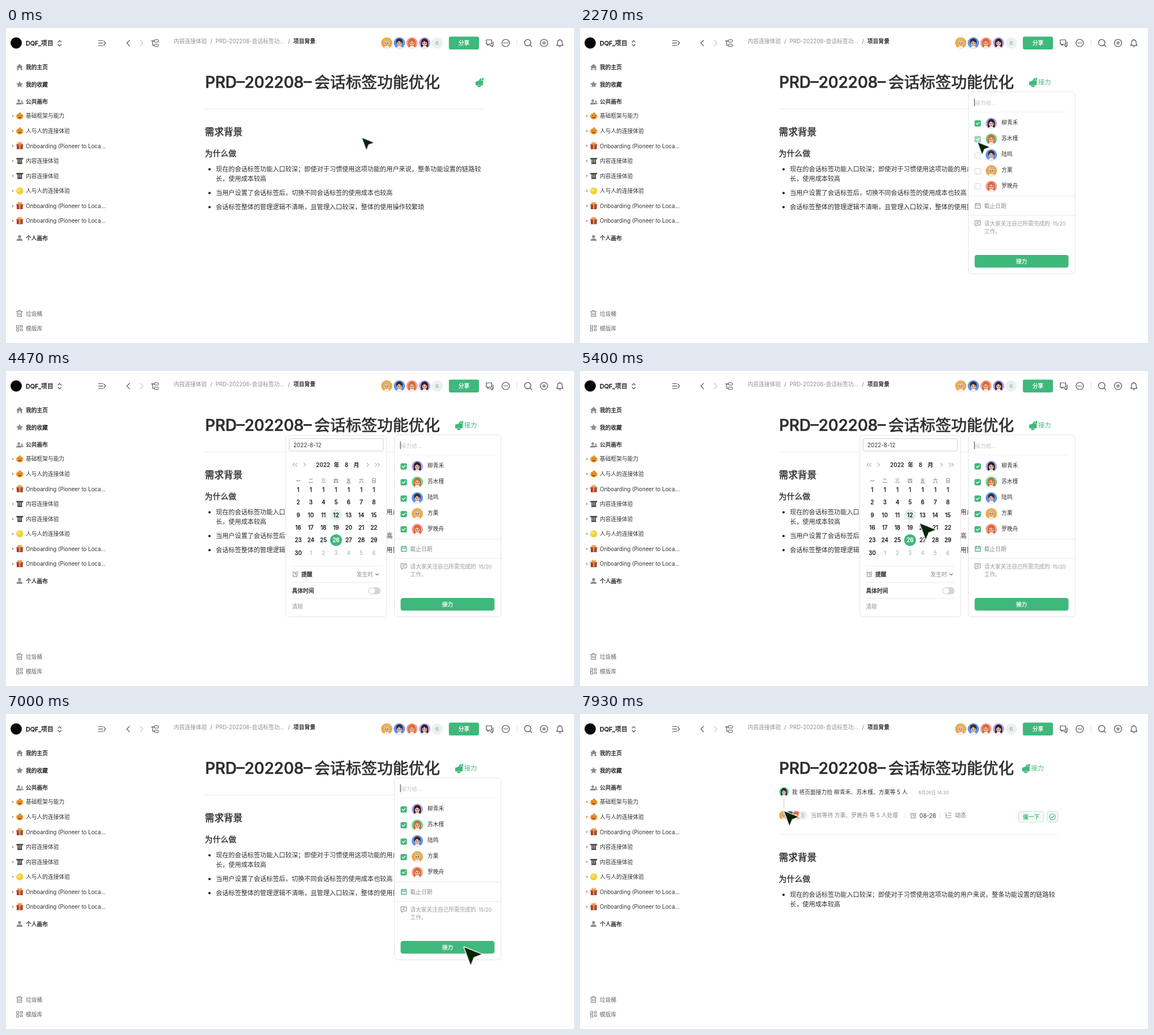
Write an HTML page that moves like this. It is 1004 by 558 pixels and loops after 8000 ms.

```html
<!DOCTYPE html>
<html lang="zh-CN">
<head>
<meta charset="utf-8">
<title>页面接力</title>
<style>
html, body { margin: 0; width: 100%; height: 100%; overflow: hidden; background: #fff; }
svg { display: block; width: 1004px; height: 558px; font-family: Inter, "Noto Sans CJK SC", "Noto Sans CJK", sans-serif; }
.anim { animation: 8s linear infinite both; }

#cursor { animation-name: move; }
@keyframes move {
  0%, .9% { transform: translate(629.5px, 194.8px); opacity: 1; animation-timing-function: ease-in-out; }
  8.7%, 15% { transform: translate(833.7px, 97.5px); animation-timing-function: ease-in-out; }
  23.5%, 25.5% { transform: translate(700px, 174px); animation-timing-function: ease-in-out; }
  27.9%, 29.5% { transform: translate(703.3px, 202.8px); animation-timing-function: ease-in-out; }
  32%, 33.5% { transform: translate(703px, 231px); animation-timing-function: ease-in-out; }
  35.8%, 37% { transform: translate(703px, 262px); animation-timing-function: ease-in-out; }
  39.5%, 41% { transform: translate(703px, 286px); animation-timing-function: ease-in-out; }
  44%, 47.5% { transform: translate(701px, 311px); opacity: 1; }
  51% { transform: translate(701px, 311px); opacity: 0; animation-timing-function: step-end; }
  58% { transform: translate(574px, 246px) scale(1.2); opacity: 0; }
  60%, 64% { transform: translate(574px, 246px) scale(1.2); opacity: 1; animation-timing-function: ease-in; }
  68.4% { transform: translate(613px, 281px) scale(1.42); }
  77.5% { transform: translate(714.8px, 375.3px) scale(1.44); }
  79.1% { transform: translate(738px, 385px) scale(1.47); animation-timing-function: ease-out; }
  84.5% { transform: translate(810px, 413.3px) scale(1.5); opacity: 1; }
  92.49% { transform: translate(810px, 413.3px) scale(1.5); opacity: 1; animation-timing-function: step-end; }
  92.5% { transform: translate(361px, 172.3px) scale(1.22); opacity: 0; animation-timing-function: step-end; }
  94.1%, 100% { transform: translate(361px, 172.3px) scale(1.22); opacity: 1; }
}
#relay { animation-name: slide; }
@keyframes slide {
  0%, 8.8% { transform: none; animation-timing-function: ease-out; }
  12.4%, 95.8% { transform: translateX(-36px); animation-timing-function: ease-in-out; }
  99.1%, 100% { transform: translateX(-48.5px); }
}
#relayText { animation-name: label; }
@keyframes label { 0%, 8.8% { opacity: 0; } 12.4%, 100% { opacity: 1; } }
#panel { animation-name: panel; }
@keyframes panel {
  0%, 15% { opacity: 0; transform: translateY(-42px); animation-timing-function: ease-out; }
  19.5%, 92.49% { opacity: 1; transform: none; }
  92.5%, 100% { opacity: 0; transform: none; }
}
#calendar { animation-name: calendar; }
@keyframes calendar { 0%, 49% { opacity: 0; } 54%, 69.2% { opacity: 1; } 73.5%, 100% { opacity: 0; } }
#caret { animation-name: blink; animation-timing-function: step-end; }
@keyframes blink { 0%, 37.5%, 48% { opacity: 1; } 32.5%, 43% { opacity: 0; } }
.check { animation-name: check; }
@keyframes check { 0% { opacity: 0; } 1.75%, 70% { opacity: 1; } 70.1%, 100% { opacity: 0; } }
#send { animation-name: press; transform-box: fill-box; transform-origin: center; }
@keyframes press { 0%, 81.5% { transform: none; } 84.5% { transform: scale(1.07); } 87.4%, 100% { transform: none; } }
#body { animation-name: push; }
@keyframes push { 0%, 95.8% { transform: none; animation-timing-function: ease-in-out; } 99.1%, 100% { transform: translateY(70px); } }
#rest { animation-name: leave; }
@keyframes leave { 0%, 95.8% { opacity: 1; } 98.3%, 100% { opacity: 0; } }
#status { animation-name: enter; }
@keyframes enter { 0%, 95.8% { opacity: 0; } 99.1%, 100% { opacity: 1; } }
</style>
</head>
<body>
<svg id="stage" viewBox="0 0 1004 558"></svg>
<script>
const GREEN = '#3fb87b', INK = '#2f2f2f', GREY = '#909090';
const PEOPLE = ['柳青禾', '苏木槿', '陆鸣', '方栗', '罗晚舟'];

// Text is placed by its vertical centre; a hairline stroke gives the medium weight.
const text = (x, cy, size, str, fill = INK, weight = 400, anchor = 'start') =>
  `<text x="${x}" y="${cy + size * .37}" font-size="${size}" fill="${fill}" font-weight="${weight}" text-anchor="${anchor}"` +
  (weight === 500 ? ` stroke="${fill}" stroke-width="${size * .027}"` : '') + `>${str}</text>`;
const line = (d, color = '#4a4a4a', w = 1.2) =>
  `<path d="${d}" fill="none" stroke="${color}" stroke-width="${w}" stroke-linecap="round" stroke-linejoin="round"/>`;
const shape = (d, fill) => `<path d="${d}" fill="${fill}"/>`;
const dot = (x, y, r, fill) => `<circle cx="${x}" cy="${y}" r="${r}" fill="${fill}"/>`;
const ring = (x, y, r, color = '#4a4a4a', w = 1.2) =>
  `<circle cx="${x}" cy="${y}" r="${r}" fill="none" stroke="${color}" stroke-width="${w}"/>`;
const box = (x, y, w, h, rx, fill, stroke = 'none') =>
  `<rect x="${x}" y="${y}" width="${w}" height="${h}" rx="${rx}" fill="${fill}" stroke="${stroke}"/>`;
const rule = (x1, x2, y, color = '#e9e9e9') => line(`M${x1} ${y}H${x2}`, color, 1);
const at = (x, y, inner, s = 1) => `<g transform="translate(${x} ${y}) scale(${s})">${inner}</g>`;
const layer = (id, inner) => `<g id="${id}" class="anim">${inner}</g>`;
const times = (list, fn) => list.map(fn).join('');

const LOOKS = {
  blond: ['#f0a848', '#d9b878'], dark: ['#5b92f5', '#3a2c2a'], ginger: ['#f59a9c', '#d9672b'],
  long: ['#b5a0ee', '#2b2230'], mint: ['#5fd6a0', '#d9672b'], mintLong: ['#5fd6a0', '#2b2230']
};
function avatar(x, y, r, look) {
  const [bg, hair] = LOOKS[look];
  const sides = /long|mint|ginger/i.test(look) ? `<rect x="-6.4" y="-5" width="12.8" height="13" rx="4" fill="${hair}"/>` : '';
  return at(x, y, dot(0, 0, 10, bg) + sides + dot(0, -2, 5.9, hair) +
    shape('M-4.8 8.6Q-4 5.2 0 5.2T4.8 8.6Q0 11 -4.8 8.6Z', '#f6f1ee') +
    '<ellipse cy=".8" rx="4.3" ry="4.9" fill="#efc3a2"/>' +
    dot(-1.8, .3, .9, '#3a2c2a') + dot(1.8, .3, .9, '#3a2c2a') +
    line('M-1.4 3.4Q0 4.4 1.4 3.4', '#a8503f', .8) +
    shape('M-4.6 -.8Q-4.8 -6 0 -6T4.6 -.8Q1 -2 -.6 -3.8Q-2 -1.8 -4.6 -.8Z', hair), r / 10);
}

const alarm = (x, y) => at(x, y, ring(0, .4, 4, '#777', 1) +
  line('M0 -2V.6H2M-5 -3L-3 -4.8M5 -3L3 -4.8M-3 4L-4 5M3 4L4 5', '#777', 1));
const chevron = (x, y, dir, color = '#666', w = 1) => line(`M${x - 1.5 * dir} ${y - 3}l${3 * dir} 3l${-3 * dir} 3`, color, w);

const EMOJI = {
  pumpkin: '<ellipse cy=".6" rx="6.3" ry="5.5" fill="#f29a2b"/>' + shape('M-1 -4.2Q-1 -6.5 1.6 -6.4L1.4 -4Z', '#5f8a35') +
    shape('M-3.6 0L-2.4 -2L-1.2 0ZM1.2 0L2.4 -2L3.6 0ZM-3.6 2H3.6Q2.2 4.2 0 4.2T-3.6 2Z', '#8a470c'),
  gift: box(-5.4, -1.4, 10.8, 7.2, .8, '#a8402c') + box(-6, -3.4, 12, 3, .6, '#c4503a') +
    box(-1.2, -3.4, 2.4, 9.2, 0, '#d9a441') + line('M0 -3.6Q-4.6 -4 -3 -5.8T0 -3.6Q4.6 -4 3 -5.8T0 -3.6', '#d9a441', 1.4),
  columns: box(-6, -5.2, 12, 2.4, 0, '#3f3a34') + box(-4.2, 3.2, 8.4, 2.2, 0, '#3f3a34') +
    times([-2.9, 0, 2.9], x => box(x - 1.1, -3, 2.2, 6.4, 0, '#5a5348')),
  moon: dot(0, 0, 6.2, '#f6cf2f') + dot(-1.5, -1.5, 3, '#fbe06a')
};

function topBar() {
  return dot(18, 26.5, 10, '#050505') + text(35, 27, 10.8, 'DQF_项目', '#1d1d1d', 500) +
    line('M92 25L94.8 22.2L97.6 25M92 29L94.8 31.8L97.6 29', '#444', 1.1) +
    line('M163.5 22.5H171M163.5 26.7H171M163.5 31H171M173 23.2L175.8 26.7L173 30.2') +
    line('M218.4 21.8L213.6 26.7L218.4 31.6') + line('M237.4 21.8L242.2 26.7L237.4 31.6', '#c4c4c4') +
    box(262.3, 20.8, 7, 4.2, .8, 'none', '#4a4a4a') + box(262.3, 28.6, 7, 4.2, .8, 'none', '#4a4a4a') +
    line('M257 22.9H262M259.3 22.9V30.7H262', '#4a4a4a', 1.1) +
    text(296.5, 23.3, 9.75, '内容连接体验', GREY) + text(361, 23.3, 9.75, '/', '#777') +
    text(370.5, 23.3, 9.75, 'PRD-202208-会话标签功...', GREY) + text(498.5, 23.3, 9.75, '/', '#777') +
    text(508, 23.3, 9.75, '项目背景', '#222', 500) +
    times(['blond', 'dark', 'ginger', 'long'], (k, i) => avatar(673 + i * 22.3, 26.5, 10, k)) +
    dot(762.3, 26.5, 10, '#eeefef') + text(762.3, 26.8, 9.5, '6', '#71b394', 400, 'middle') +
    box(782.8, 15.2, 53.2, 22.8, 3, GREEN) + text(809.5, 26.6, 9.8, '分享', '#fff', 500, 'middle') +
    line('M850.5 21H858.5V28.5H854L851.5 30.8V28.5H849V21ZM861 24.5V31.2H859.6V33.3L857 31.2H855') +
    ring(883.3, 26.5, 6.5) + times([-2.8, 0, 2.8], x => dot(883.3 + x, 26.5, .9, '#4a4a4a')) +
    line('M903.3 20.5V33', '#ddd', 1) + ring(922.2, 26, 5.6) + line('M926.4 30.2L929.2 33') +
    ring(951, 26.5, 6.5) + line('M948 26.5H954M951 23.5V29.5') +
    line('M973.5 30.8Q975 29.3 975 25.5Q975 21.2 979 21.2T983 25.5Q983 29.3 984.5 30.8ZM977.5 33H980.5M979 19.8V21');
}

function sidebar() {
  const heads = [[69.3, '我的主页'], [100, '我的收藏'], [130.7, '公共画布'], [372, '个人画布']];
  const board = 'Onboarding (Pioneer to Loca...';
  const rows = [['pumpkin', '基础框架与能力'], ['pumpkin', '人与人的连接体验'], ['gift', board], ['columns', '内容连接体验'],
    ['columns', '内容连接体验'], ['moon', '人与人的连接体验'], ['gift', board], ['gift', board]];
  const person = dot(0, -2.6, 2.7, '#8d8d8d') + shape('M-5.4 5Q-5.4 .8 0 .8T5.4 5Z', '#8d8d8d');
  return times(heads, ([y, s]) => text(35, y, 9.75, s, '#1c1c1c', 500)) +
    times(rows, ([icon, s], i) => {
      const y = 155.8 + i * 26.55;
      return shape(`M11 ${y - 2.3}L14 ${y}L11 ${y + 2.3}Z`, '#9b9b9b') + at(24.3, y, EMOJI[icon]) +
        text(35, y, 9.75, s, '#333');
    }) +
    shape('M18 69L24 63.4L30 69H28.4V74.8H25.6V71H22.4V74.8H19.6V69Z', '#8d8d8d') +
    shape('M24 93.8L25.8 97.6L30 98.2L27 101.1L27.7 105.3L24 103.3L20.3 105.3L21 101.1L18 98.2L22.2 97.6Z', '#8d8d8d') +
    at(22.5, 131, person, .9) + at(28, 131.5, person, .6) + at(24, 372, person) +
    line('M18.5 502.3H29M20 502.5V511H27.6V502.5M21.6 500.5H26M22.5 505V508.6M25.2 505V508.6', '#777', 1.1) +
    text(35, 506, 9.75, '垃圾桶', '#666') +
    times([[18.7, 527], [25.3, 527], [18.7, 533], [25.3, 533]], ([x, y], i) => box(x, y, 3.8, i % 2 ? 3 : 4, 0, 'none', '#777')) +
    text(35, 532, 9.75, '模版库', '#666');
}

function article() {
  const item = (y, ...rows) => dot(359.8, y + .3, 2.1, '#222') + times(rows, (s, i) => text(371, y + i * 16.8, 11.17, s));
  return text(352, 96, 27.75, 'PRD–202208–<tspan x="545">会话标签功能优化</tspan>', INK, 500) +
    layer('relay', shape('M830 95.2L836 93.2L837.6 90.2Q839 88.4 840.6 89.6L839.8 93H843.2V101.4H830Z', GREEN) +
      shape('M839.6 92L841.6 88L844.6 89.2L843 93Z', GREEN) + shape('M832.6 102H840.4L838 104.8H834.6Z', GREEN) +
      line('M839.4 93.4L841.4 88.6', '#fff', .6) +
      layer('relayText', text(846, 96.3, 11.2, '接力', GREEN))) +
    layer('body', rule(352, 844.5, 143.5) + text(351.5, 183.5, 16.65, '需求背景', INK, 500) +
      text(351.5, 221.8, 13.9, '为什么做', INK, 500) +
      item(250, '现在的会话标签功能入口较深；即使对于习惯使用这项功能的用户来说，整条功能设置的链路较', '长，使用成本较高') +
      layer('rest', item(292, '当用户设置了会话标签后，切换不同会话标签的使用成本也较高') +
        item(317, '会话标签整体的管理逻辑不清晰，且管理入口较深，整体的使用操作较繁琐')));
}

function status() {
  const [a, b, , d, e] = PEOPLE;
  return avatar(360.5, 138, 8.5, 'mintLong') +
    text(374.5, 138, 9.87, `我 将页面接力给 ${a}、${b}、${d}等 5 人`, '#333') +
    text(598, 138.7, 8, '8月26日 14:30', '#999') + line('M360.5 151V166', '#c9c9c9', 1) +
    times(['blond', 'dark', 'ginger'], (k, i) => avatar(360 + i * 11, 179.5, 8, k)) +
    dot(394, 179.5, 8, '#eceded') + text(394, 179.8, 8.5, '5', '#71b394', 400, 'middle') +
    text(408, 179.8, 9.8, `当前等待 ${d}、${e} 等 5 人处理`, '#8a8a8a') +
    line('M575 176V184M637 176V184', '#ddd', 1) + alarm(589, 180) + text(600, 179.8, 10, '08-26', '#777', 500) +
    line('M647 175V184H649M647 179.5H649M651 175.5H656M651 179.6H656M651 184H656', '#888', 1) + text(663, 179.8, 9.8, '动态', '#777') +
    box(775.5, 172.5, 44, 19, 3, '#f3faf6', '#c3e6d4') + text(797.5, 182, 9.8, '催一下', GREEN, 500, 'middle') +
    box(825.5, 172.5, 19, 19, 3, '#f3faf6', '#c3e6d4') + ring(835, 182, 5.2, GREEN, 1.1) + line('M832.6 182L834.4 183.8L837.4 180.6', GREEN, 1.1);
}

const dayIcon = color => line('M698.6 311.4H707.6V319.4H698.6ZM698.6 314.2H707.6M700.8 310V312M705.4 310V312', color, 1.1);
const ticked = (ms, inner) => `<g class="anim check" style="animation-delay:${ms}ms">${inner}</g>`;

function panel() {
  const looks = ['long', 'mint', 'dark', 'blond', 'ginger'];
  const ticks = [1950, 2200, 2560, 2860, 3160], ys = [169, 197, 226, 253.5, 280.5];
  return box(686.5, 113, 188.5, 322.5, 6, '#fff', '#e3e3e3') +
    layer('caret', line('M697.2 125V138', '#444', 1.1)) + text(698, 132, 9.6, '接力给...', '#c3c3c3') + rule(697, 864, 149, '#f1f1f1') +
    times(PEOPLE, (name, i) => box(698, ys[i] - 5, 10, 10, 1.5, '#fff', '#cfcfcf') +
      ticked(ticks[i], box(697.5, ys[i] - 5.5, 11, 11, 2, GREEN) + line(`M700.4 ${ys[i]}l2 2l3.6 -3.8`, '#fff', 1.2)) +
      avatar(727, ys[0] + i * 27.9, 10, looks[i]) + text(745, 167 + i * 28, 9.75, name, '#333')) +
    rule(687, 874.5, 297.5) + dayIcon('#999') + ticked(3500, dayIcon(GREEN)) + text(714.5, 315.3, 9.75, '截止日期', '#8d8d8d') +
    rule(687, 874.5, 332) + line('M698.5 341.5H708V349H702.4L699.6 351.3V349H698.5ZM701 344H705.6M701 346.5H704', '#888', 1) +
    text(714.5, 346, 9.7, '请大家关注自己所需完成的', '#9a9a9a') + text(835.5, 346.8, 8.8, '15/20', '#9a9a9a') + text(714.5, 360, 9.7, '工作。', '#9a9a9a') +
    layer('send', box(697.5, 402, 166, 22.5, 4, GREEN) + text(780.5, 413.4, 9.75, '接力', '#fff', 500, 'middle'));
}

function calendar() {
  const col = i => 516.5 + i * 22.3, row = j => 210.5 + j * 22.3;
  const days = Array.from({ length: 42 }, (_, n) => {
    const day = n < 7 ? 1 : n < 36 ? n - 5 : n - 35;
    const fill = n > 35 ? '#aaa' : day === 26 ? '#fff' : '#222';
    return text(col(n % 7), row(Math.floor(n / 7)), 9.8, day, fill, n > 35 ? 400 : 500, 'middle');
  }).join('');
  return box(494.5, 114, 178.5, 321.5, 6, '#fff', '#e3e3e3') + box(500.5, 119.8, 166.5, 22, 3, '#fff', '#cfcfcf') +
    text(508, 131, 9.9, '2022-8-12', '#333') +
    chevron(508.5, 166, -1, '#888') + chevron(513, 166, -1, '#888') + chevron(528, 166, 1, '#888') +
    chevron(639.5, 166, 1, '#888') + chevron(654, 166, 1, '#888') + chevron(658.5, 166, 1, '#888') +
    times([[560.5, '2022'], [584.5, '年'], [602, '8'], [619.5, '月']], ([x, s]) => text(x, 166, 9.8, s, '#222', 600, 'middle')) +
    times([...'一二三四五六日'], (s, i) => text(col(i), 195, 8.6, s, '#555', 400, 'middle')) +
    dot(col(3), row(2), 10.5, '#e2f2ea') + dot(col(3), row(4), 10.5, GREEN) + days +
    rule(505.5, 662, 346) + alarm(511.3, 360) + text(522, 360.3, 9.75, '提醒', '#222', 500) +
    text(619.5, 360.3, 9.75, '发生时', '#8d8d8d') + line('M653.3 358.8L656 361.5L658.7 358.8', '#777', 1.1) +
    rule(505.5, 662, 374.5) + text(505.5, 389, 9.75, '具体时间', '#222', 500) +
    box(640.5, 383, 21.5, 12.5, 6.25, '#d5d5d5') + dot(647, 389.2, 5.2, '#fff') +
    rule(505.5, 662, 403) + text(505.5, 417.5, 9.75, '清除', '#8d8d8d');
}

const cursor = '<path d="M0 0L20.4 8.2L11.2 11.6L7.6 20.8Z" fill="#082508" stroke="#fff" stroke-width="2" paint-order="stroke" stroke-linejoin="round"/>';

document.getElementById('stage').innerHTML = topBar() + sidebar() + article() +
  layer('status', status()) + layer('panel', panel()) + layer('calendar', calendar()) + layer('cursor', cursor);
</script>
</body>
</html>
```
